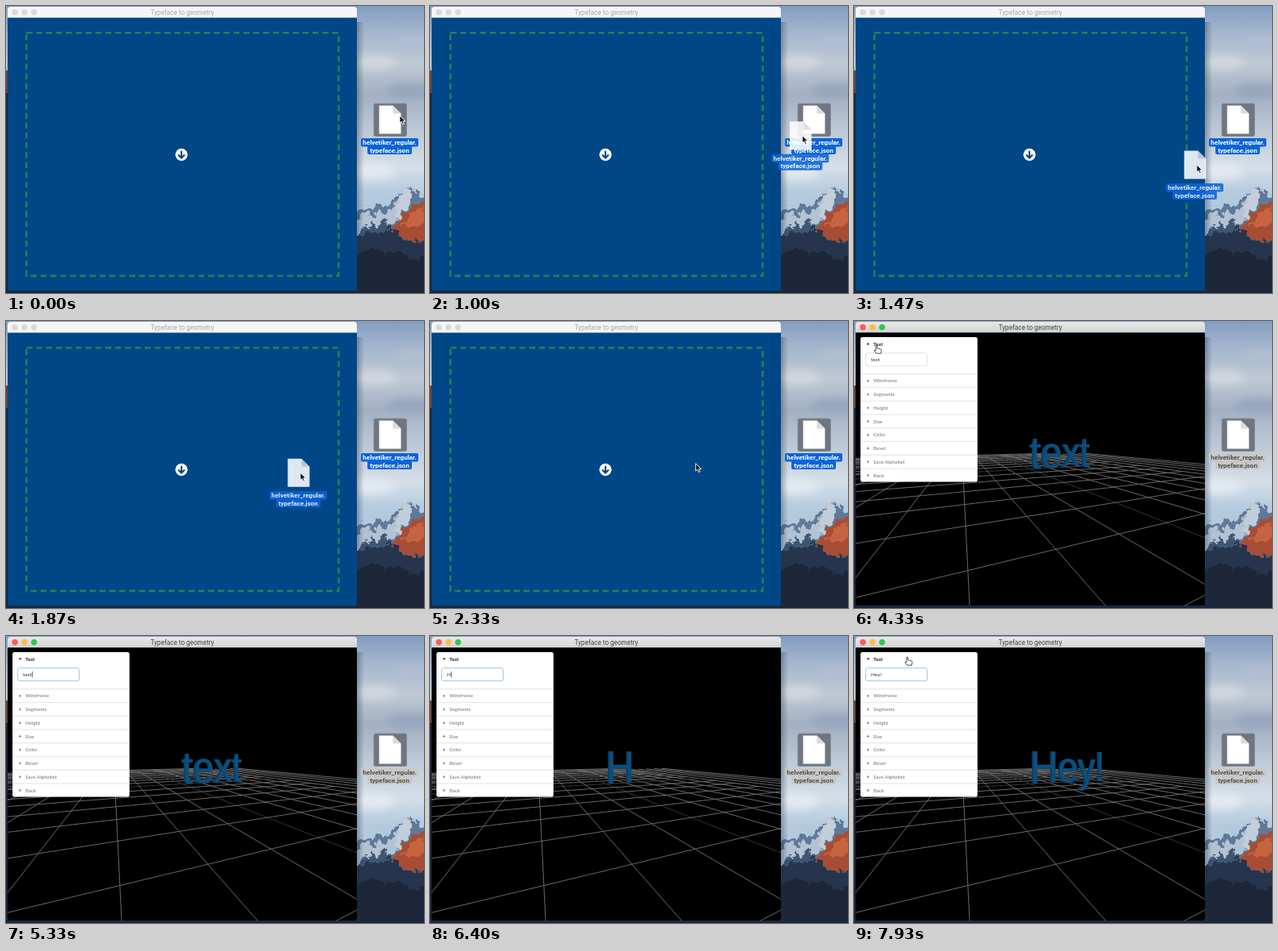
An HTML page that plays this animation: 517x356 px, repeating every 8 s.

```html
<!DOCTYPE html>
<html lang="en">
<head>
<meta charset="utf-8">
<title>Typeface to geometry</title>
<style>
html, body { margin: 0; width: 100%; height: 100%; overflow: hidden; background: #16202f; }
svg { position: absolute; left: 0; top: 0; width: 517px; height: 356px; }
#title { font: 8.15px Roboto, sans-serif; text-anchor: middle; }
.label { font: 700 8px Roboto, sans-serif; text-anchor: middle; }
.row { font: 700 6.1px Lato, sans-serif; fill: #929292; }
#value { font: 6.4px Lato, sans-serif; fill: #333; }
#space { position: absolute; left: 2px; top: 14px; width: 432px; height: 339px; overflow: hidden;
  perspective: 450px; perspective-origin: 216px 140px; }
#space span { position: absolute; left: 215.500px; top: 120.500px; font: 57px/57px "Liberation Sans", Arial, sans-serif;
  white-space: pre; color: #083f66; transform-origin: 0 48px; }
#space span:last-child { color: #0b4f7d; }
</style>
</head>
<body>
<svg viewBox="0 0 517 356">
  <defs>
    <linearGradient id="sky" x2="0" y2="1">
      <stop offset="0" stop-color="#829dc2"/><stop offset=".09" stop-color="#a3b5cd"/>
      <stop offset=".2" stop-color="#c0c9d5"/><stop offset=".31" stop-color="#a2b0c3"/>
      <stop offset=".42" stop-color="#bac6d4"/><stop offset=".56" stop-color="#d5dfe8"/>
      <stop offset=".66" stop-color="#b3c9de"/>
    </linearGradient>
    <linearGradient id="bar" x2="0" y2="1">
      <stop offset="0" stop-color="#e9e9e9"/><stop offset="1" stop-color="#d3d3d3"/>
    </linearGradient>
    <linearGradient id="shade">
      <stop offset="0" stop-color="#1d2b40" stop-opacity=".35"/><stop offset="1" stop-color="#1d2b40" stop-opacity="0"/>
    </linearGradient>
    <filter id="soft" x="-50%" y="-50%" width="200%" height="200%"><feGaussianBlur stdDeviation="5"/></filter>
    <filter id="rough">
      <feTurbulence type="fractalNoise" baseFrequency=".13" numOctaves="3" seed="4"/>
      <feDisplacementMap in="SourceGraphic" scale="14" xChannelSelector="R" yChannelSelector="G"/>
    </filter>
    <clipPath id="view"><rect x="2" y="14" width="432" height="339"/></clipPath>
    <g id="sheet">
      <path d="M461.500 123.500h17l10 10v25h-27z" fill="#fff"/>
      <path d="M478.500 123.500v10h10z" fill="#d9dbde"/>
    </g>
    <g id="name">
      <rect x="439" y="164" width="71" height="10.500" rx="2"/>
      <rect x="447" y="173.500" width="55" height="10.500" rx="2"/>
      <g class="label" fill="var(--ink)">
        <text x="474.500" y="172">helvetiker_regular.</text>
        <text x="474.500" y="181.700">typeface.json</text>
      </g>
    </g>
  </defs>

  <g id="wallpaper">
    <rect width="517" height="356" fill="url(#sky)"/>
    <g filter="url(#soft)">
      <ellipse cx="455" cy="70" rx="28" ry="9" fill="#d0d6de"/>
      <ellipse cx="505" cy="45" rx="22" ry="8" fill="#b0bed2"/>
      <ellipse cx="500" cy="105" rx="30" ry="9" fill="#96a6bd"/>
      <ellipse cx="452" cy="205" rx="30" ry="10" fill="#e2e9ef"/>
    </g>
    <g filter="url(#rough)">
      <path d="M425 256l19-7 9 5 9-9 10 3 8-9 8-10 9-3 9 2 7 9 14 4v125H425z" fill="#5f7a98"/>
      <path d="M425 270l21-14 8 8 8-13 9 8 12-18 5 12-11 19-9 1-9 15-8-7-26 13z" fill="#b4c3d3"/>
      <path d="M488 229l9-3 7 7-5 16-8 6-6 14-4-8z" fill="#c2ced9"/>
      <path d="M436 284l16-17 6 10 9-12 10 16 5 14-46 6z" fill="#3e5673"/>
      <path d="M477 278l13-18 13-12 24-13v58l-28-3-13-7z" fill="#a84d35"/>
      <path d="M489 271l13-14 15-9v22l-15 5z" fill="#c66341"/>
      <path d="M425 292l24-12 12 4 14-10 19 15 33 5v72H425z" fill="#26364d"/>
      <path d="M425 314l29-15 13 9 17-6 15 14 28-6v66H425z" fill="#1c2737"/>
    </g>
    <path d="M434 20h9v333h-9z" fill="url(#shade)"/>
    <path d="M0 80h3v28H0z" fill="#6f4238"/>
    <path d="M0 108h3v245h514v3H0z" fill="#1a2638"/>
  </g>

  <rect x="455" y="121" width="40.500" height="40.500" rx="2" fill="#6f7681" stroke="#858c96"/>
  <use href="#sheet"/>
  <use href="#name" id="fileName"/>

  <rect x="2" y="1" width="432" height="352.500" rx="3" fill="#004788"/>
  <path id="barShape" d="M2 14.500V4q0-3 3-3h426q3 0 3 3v10.500z"/>
  <g id="lights"></g>
  <text id="title" x="218" y="11">Typeface to geometry</text>

  <g id="drop">
    <rect x="25.200" y="33.200" width="386.300" height="301.500" fill="none" stroke="#2c7f52" stroke-width="2.400" stroke-dasharray="7.500 4.700"/>
    <circle cx="217" cy="184.300" r="7.600" fill="#fff"/>
    <path d="M217 179.700v8.500M213 184.600l4 4 4-4" fill="none" stroke="#004788" stroke-width="2.100"/>
  </g>

  <g id="scene">
    <path d="M2 14.500h432V350q0 3-3 3H5q-3 0-3-3z" fill="#000"/>
    <g id="grid" clip-path="url(#view)" fill="none"></g>
    <g id="panel">
      <rect id="sheetBack" x="8" y="20" width="144.700" rx="2.500" fill="#fff"/>
      <g id="first"></g>
      <g id="field">
        <rect id="box" x="14.500" y="39.700" width="76" height="16" rx="2.500" fill="#fff"/>
        <text id="value" x="21" y="50.200"></text>
        <path id="caret" d="M0 44v7.500" stroke="#333" stroke-width=".7"/>
      </g>
      <g id="rest"></g>
    </g>
  </g>
</svg>
<div id="space"></div>
<svg viewBox="0 0 517 356">
  <g id="ghost" opacity=".87"><use href="#sheet"/><use href="#name" fill="#0a64d8" style="--ink:#fff"/></g>
  <g id="pointer" stroke-linejoin="round">
    <path id="arrow" d="M0 0v9.300l2.200-2 1.500 3.500 1.700-.7-1.500-3.400h3z" fill="#111" stroke="#fff" stroke-width=".9"/>
    <path id="hand" d="M-1-1.500q1-1 1.800 0v3.300l4.300 1.100q1.200.4 1 1.700l-.7 3.600H-.3L-3 4.700q.2-1.600 2 0z" fill="#fff" stroke="#222" stroke-width=".8"/>
    <path id="beam" d="M-1.500-4q1.500 0 1.500 1.200V3q0 1.200-1.500 1.200M1.500-4Q0-4 0-2.800V3q0 1.200 1.500 1.200" fill="none" stroke="#333" stroke-width=".8"/>
  </g>
</svg>
<script>
const LOOP = 8000;
const $ = id => document.getElementById(id);
const show = (id, on) => { $(id).style.display = on ? '' : 'none'; };
const set = (id, attrs) => { for (const key in attrs) $(id).setAttribute(key, attrs[key]); };

// time, x, y of the mouse
const path = [
  [0, 487, 136], [330, 480, 140], [600, 477, 141], [800, 475, 143], [1130, 451, 172],
  [1470, 424, 197], [1800, 373, 191], [2130, 331, 178], [2330, 329, 177], [2530, 262, 133],
  [2930, 87, 11], [3600, 87, 11], [4000, 30, 31], [4200, 28, 32], [4400, 28, 32],
  [4800, 42, 48], [7400, 42, 48], [7670, 58, 37], [7870, 66, 28], [8000, 66, 28]
];
const typed = [
  [0, 'text'], [5400, 'tex'], [5530, 'te'], [5670, 't'], [5800, ''],
  [6270, 'H'], [6670, 'He'], [6930, 'Hey'], [7270, 'Hey!']
];
const events = {
  grab: 700, release: 2200, load: 2530, activate: 3600, hover: 3960, open: 4170,
  opened: 4310, turn: 4380, focus: 4870, type: 5330, moveAgain: 7470
};
const rows = ['Text', 'Wireframe', 'Segments', 'Height', 'Size', 'Color', 'Bevel', 'Save Alphabet', 'Back'];
const lightColors = ['#fc5b57', '#fdbc40', '#34c749'];

function buildGrid() {
  // Both families of floor lines run to their own vanishing point.
  const horizon = 150, floor = 353, leftVanish = 133, rightVanish = 800, half = 10;
  const a = i => 647 - 168 * i, b = j => -2727 + 448 * j;
  const depth = (i, j) => {
    const t = (rightVanish - leftVanish) / (a(i) - b(j));
    return t > 0 ? Math.min(t, 2) : 2;
  };
  const line = (vanish, foot, near, far, dim) => {
    const point = t => `${vanish + (foot - vanish) * t} ${horizon + (floor - horizon) * t}`;
    return `<path d="M${point(far)}L${point(near)}" stroke="${dim ? '#333' : '#686868'}"/>`;
  };
  let out = '';
  for (let k = -half; k <= half; k++) {
    out += line(leftVanish, a(k), depth(k, half), depth(k, -half), k === 0);
    out += line(rightVanish, b(k), depth(half, k), depth(-half, k), k === 0);
  }
  $('grid').innerHTML = out;
}

function buildPanel() {
  const row = (name, i) => {
    const y = 28.6 + 16.75 * i;
    const rule = i ? `<path d="M8 ${y - 8.4}h144.700" stroke="#dcdcdc" stroke-width=".8"/>` : '';
    return `${rule}<path class="mark" d="M16.500 ${y - 2}l2.300 2-2.300 2z" fill="#777"/>` +
      `<text class="row" x="24" y="${y + 2.2}">${name}</text>`;
  };
  $('first').innerHTML = row(rows[0], 0);
  $('rest').innerHTML = rows.slice(1).map((name, i) => row(name, i + 1)).join('');
}

function buildWord() {
  for (let z = 4; z >= 0; z--) {
    const layer = document.createElement('span');
    layer.style.transform = `rotateY(28deg) translateZ(${-z}px)`;
    $('space').append(layer);
  }
}

function mouseAt(t) {
  const k = Math.max(1, path.findIndex(p => p[0] > t));
  const [t0, x0, y0] = path[k - 1], [t1, x1, y1] = path[k];
  const u = (t - t0) / (t1 - t0);
  return [x0 + (x1 - x0) * u, y0 + (y1 - y0) * u];
}

function drawWindow(t) {
  const active = t >= events.activate, loaded = t >= events.load;
  set('barShape', { fill: active ? 'url(#bar)' : '#f6f6f6' });
  set('title', { fill: active ? '#444' : '#a8a8a8' });
  [...$('lights').children].forEach((c, i) => c.setAttribute('fill', active ? lightColors[i] : '#dadada'));
  set('fileName', { fill: active ? '#c8c8c7' : '#0a64d8' });
  $('fileName').style.setProperty('--ink', active ? '#505050' : '#fff');
  show('drop', !loaded);
  show('scene', loaded);
  show('space', loaded);
}

function drawPanel(t) {
  const open = Math.min(1, Math.max(0, (t - events.open) / (events.opened - events.open)));
  const focused = t >= events.focus, hover = t >= events.hover;
  const [keyTime, text] = typed.filter(step => step[0] <= t).pop();
  set('sheetBack', { height: 150.8 + 28.8 * open });
  set('rest', { transform: `translate(0 ${28.8 * open})` });
  set('field', { opacity: open });
  set('box', { stroke: focused ? '#85b7d9' : '#dcdcdc', 'stroke-width': .8 });
  document.querySelector('#first text').style.fill = hover ? '#222' : '';
  const mark = document.querySelector('#first .mark');
  mark.setAttribute('fill', hover ? '#222' : '#777');
  mark.setAttribute('transform', t >= events.turn ? 'rotate(90 17.6 28.6)' : '');
  $('value').textContent = text;
  show('caret', focused && (t - Math.max(keyTime, events.focus)) % 1000 < 500);
  set('caret', { transform: `translate(${21.5 + (text ? $('value').getComputedTextLength() : 0)} 0)` });
  for (const layer of $('space').children) layer.textContent = text;
}

function drawPointer(t) {
  const [x, y] = mouseAt(t);
  const inField = y > 39 && y < 56 && x < 91 && t > events.opened;
  const inTitle = y > 20 && y < 39 && x < 152 && t > events.activate;
  set('pointer', { transform: `translate(${x} ${y})` });
  show('pointer', t < events.type || t >= events.moveAgain);
  show('beam', inField);
  show('hand', inTitle);
  show('arrow', !inField && !inTitle);
  show('ghost', t >= events.grab && t < events.release);
  set('ghost', { transform: `translate(${x - 477} ${y - 141})` });
}

$('lights').innerHTML = [11, 23, 34.7].map(x => `<circle cx="${x}" cy="7.800" r="3.700"/>`).join('');
buildGrid();
buildPanel();
buildWord();

const start = performance.now();
function frame(now) {
  const t = Math.max(0, now - start) % LOOP;
  drawWindow(t);
  drawPanel(t);
  drawPointer(t);
  requestAnimationFrame(frame);
}
frame(start);
</script>
</body>
</html>
```
